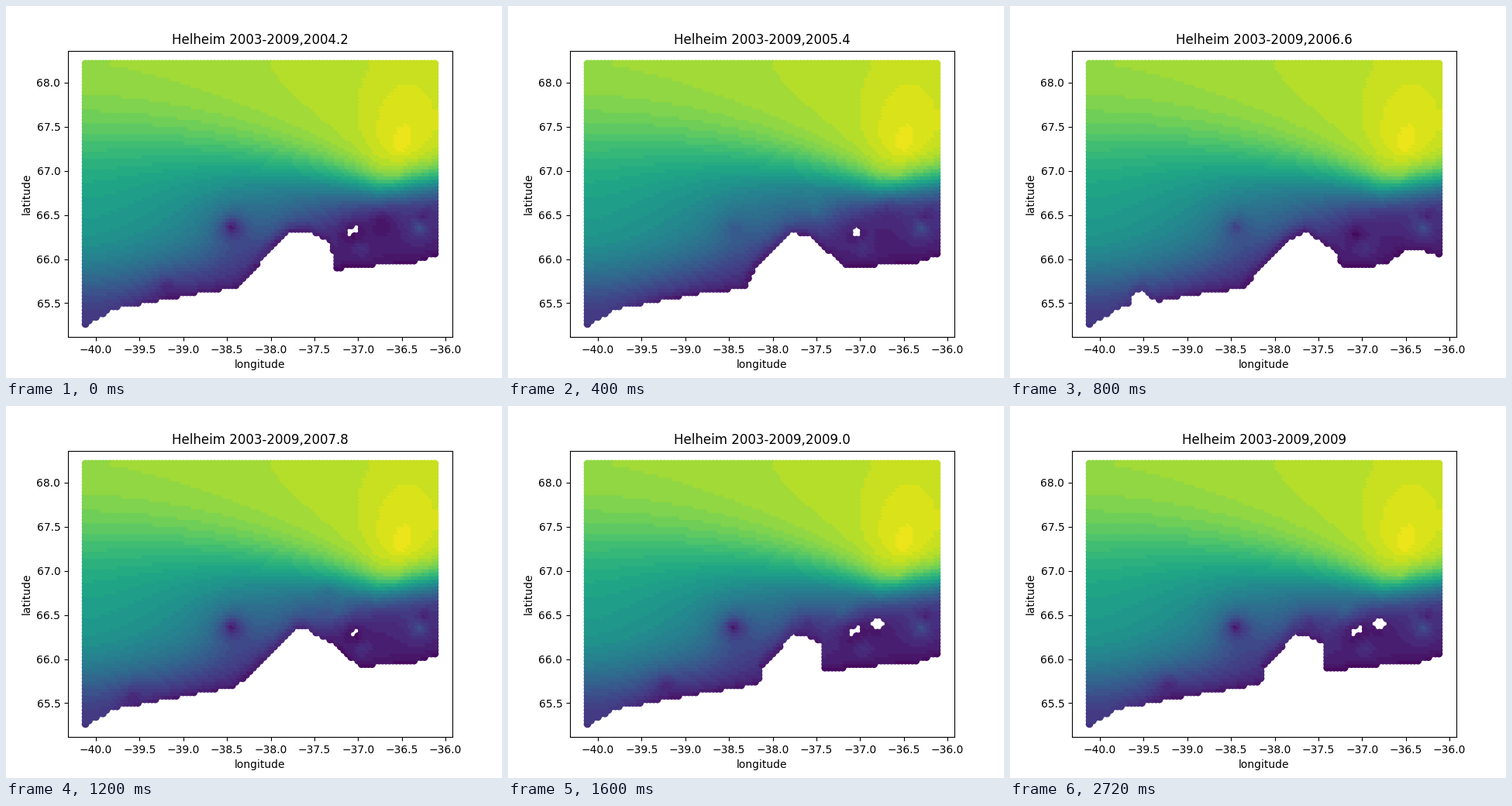
Animation, 640 px wide and 480 px high, one loop 3200 ms. Source, as a matplotlib script:

```python
import numpy as np
import matplotlib.pyplot as plt
from matplotlib.animation import FuncAnimation

plt.rcParams["text.kerning_factor"] = 6

COLS, ROWS, LEVELS = 101, 75, 36
# Shapes are placed in stage pixels, dots are plotted in degrees.
X, Y = np.meshgrid(np.linspace(102.55, 553.45, COLS),
                   np.linspace(74.4, 410.4, ROWS))
LON, LAT = np.meshgrid(np.linspace(-40.12, -36.12, COLS),
                       np.linspace(68.2128, 65.2638, ROWS))

SHORE = [(102, 411), (140, 388)]
WEST = SHORE + [(170, 383.3), (243, 369.6)]
EAST = [(436, 334), (470, 333.3), (527, 328.7), (554, 319.7)]
RIFT = [(443, 292.5, 6.5), (452, 288, 6)]

# coast: key points; pit: strength of the western hollow;
# spots: (x, y, reach, height); gaps: (x, y, radius)
STEPS = [
    dict(coast=WEST + [(300, 361), (352, 300), (368, 288), (392, 288),
                       (420, 304), (427, 338), (433, 338)] + EAST,
         pit=1, gaps=RIFT,
         spots=[(488, 275, 14, -.10), (210, 360, 15, -.10)]),
    dict(coast=WEST + [(305, 362), (318, 335), (365, 291), (388, 293)] + EAST,
         pit=.35, gaps=[(449, 291, 8)],
         spots=[(490, 255, 16, -.07), (400, 260, 18, .08)]),
    dict(coast=SHORE + [(152, 384), (158, 367), (170, 364), (190, 379),
                        (243, 369.6), (300, 362), (357, 300), (382, 288),
                        (425, 318), (429, 338), (434, 334), (470, 333.3),
                        (490, 328), (507, 313), (532, 313), (554, 320)],
         pit=.6, gaps=[],
         spots=[(448, 291, 10, -.12)]),
    dict(coast=WEST + [(295, 361), (348, 312), (372, 287), (385, 283),
                       (410, 300), (425, 304), (455, 333.5)] + EAST[1:],
         pit=1, gaps=[(447.5, 294.6, 4), (452, 290, 4)],
         spots=[(417, 236, 9, -.07), (432, 262, 14, .08), (165, 371, 14, -.1)]),
    dict(coast=WEST + [(300, 361), (323, 357), (327, 335), (368, 292),
                       (385, 293), (406, 306), (409, 338), (433, 338)] + EAST,
         pit=1, gaps=RIFT + [(477, 281, 9.6)],
         spots=[(388, 277, 14, -.10), (435, 262, 15, .10), (205, 358, 14, -.12)]),
]


def drop(center, width):
    """Smooth step from 0 in the north to 1 in the south."""
    return 1 / (1 + np.exp((center - Y) / width))


def spot(x, y, reach, height):
    return height * np.exp(-np.hypot(X - x, Y - y) / reach)


def base_surface():
    """Two slopes that grow steeper and meet towards the east."""
    e = np.clip((X - 102) / 378, 0, 1) ** 1.6
    bend = .15 * np.clip(X - 480, 0, None)
    z = .86 + .035 * e
    z -= (.32 + .44 * e) * drop(176 + 60 * e - bend, 33 - 20 * e)
    z -= (.42 - .36 * e) * drop(350 - 95 * e, 23 - 6 * e)
    z += .055 * np.exp(-((X - 520) / 38) ** 2 / 2 - ((Y - 150) / 55) ** 2 / 2)
    z += spot(512, 179, 18, .05) + spot(503, 217, 10, .07)
    z += spot(535, 285, 12, .18) + spot(540, 268, 7, -.10)
    return z + spot(460, 310, 12, .09)


BASE = base_surface()


def surface(step):
    """Visible points and their colour values for one time step."""
    z = BASE + spot(293, 283, 16, -.33 * step["pit"])
    for s in step["spots"]:
        z += spot(*s)
    depth = np.interp(X, *zip(*step["coast"])) - Y
    land = depth >= -.3
    for x, y, radius in step["gaps"]:
        land &= np.hypot(X - x, Y - y) > radius
        z += spot(x, y, 10, -.10)
    edge = np.clip((X - 130) / 70, 0, 1) * np.exp(-np.clip(depth, 0, None) / 9)
    z *= 1 - .6 * edge
    z = np.round(np.clip(z, 0, 1) * LEVELS) / LEVELS
    # southern rows first, so that northern dots lie on top
    pick = land[::-1]
    points = np.column_stack([LON[::-1][pick], LAT[::-1][pick]])
    return points, z[::-1][pick]


fields = [surface(s) for s in STEPS]
years = [f"{2004.2 + 1.2 * i:.1f}" for i in range(len(STEPS))] + ["2009"]

fig, ax = plt.subplots(figsize=(6.4, 4.8), dpi=100)
points, values = fields[0]
dots = ax.scatter(*points.T, c=values, cmap="viridis", vmin=0, vmax=1)
ax.set_xlim(-40.32, -35.92)
ax.set_ylim(65.1164, 68.3602)
ax.set_xlabel("longitude")
ax.set_ylabel("latitude")
title = ax.set_title("")


def draw(i):
    points, values = fields[min(i, len(fields) - 1)]
    dots.set_offsets(points)
    dots.set_array(values)
    title.set_text("Helheim 2003-2009," + years[min(i, len(years) - 1)])
    return dots, title


anim = FuncAnimation(fig, draw, frames=8, interval=400, repeat=True,
                     repeat_delay=0, blit=False)
plt.show()
```
